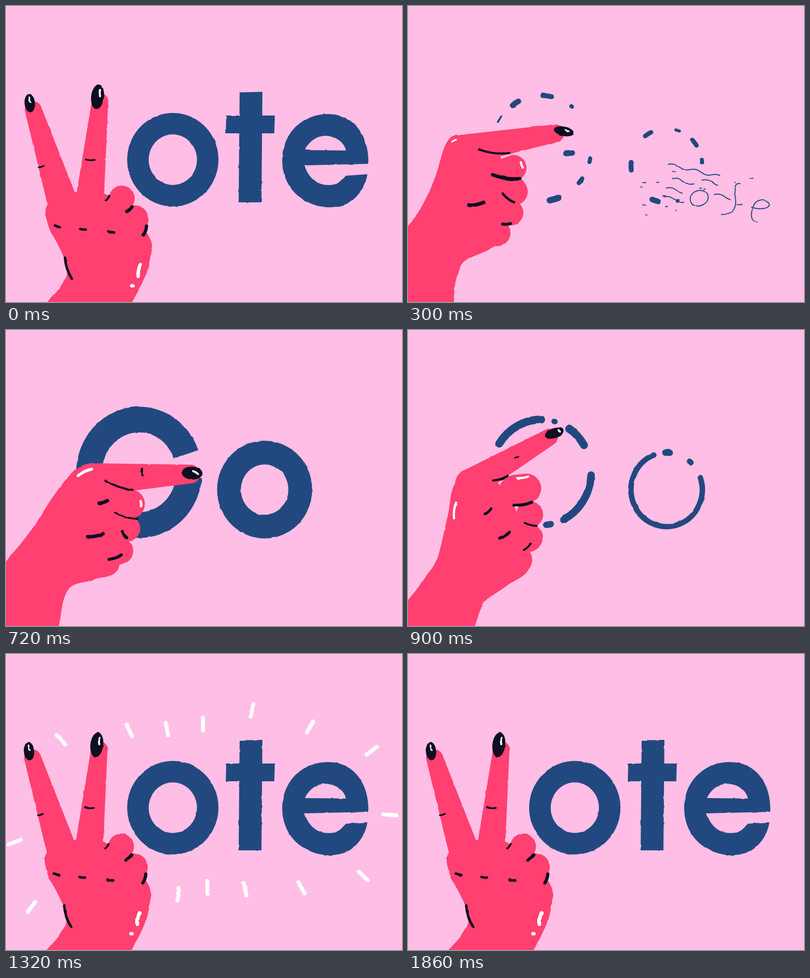
These frames come from a looping animation (800 by 600 pixels, 1.92 s). An HTML page:

```html
<!DOCTYPE html>
<html lang="en">
<head>
<meta charset="utf-8">
<title>Go vote</title>
<style>
  html, body { margin: 0; width: 100%; height: 100%; overflow: hidden; background: #ffbee6; }
  svg { display: block; width: 100vw; height: 100vh; }
</style>
</head>
<body>
<svg viewBox="0 0 800 600">
  <defs>
    <filter id="rough" filterUnits="userSpaceOnUse" x="-20" y="-20" width="840" height="640" color-interpolation-filters="sRGB">
      <feTurbulence id="grain" type="fractalNoise" baseFrequency=".06" numOctaves="2"/>
      <feDisplacementMap in="SourceGraphic" scale="2.5" xChannelSelector="R" yChannelSelector="G"/>
    </filter>
  </defs>
  <g id="art" filter="url(#rough)"></g>
</svg>
<script>
const STEP = 60, STEPS = 32;
const SKIN = '#ff4070', NAVY = '#21497f', INK = '#0d0e20', WHITE = '#fff';
const art = document.getElementById('art');
const grain = document.getElementById('grain');

const numbers = text => text.match(/-?[\d.]+/g).map(Number);
const mix = (a, b, k) => a.map((v, i) => v + (b[i] - v) * k);
const ease = k => k * k * (3 - 2 * k);
const polar = (x, y, rx, ry, angle) => [x + rx * Math.cos(angle), y + ry * Math.sin(angle)];
const fill = (d, color) => `<path d="${d}" fill="${color}" fill-rule="evenodd"/>`;
const stroke = (d, width, color, cap = 'round') =>
  `<path d="${d}" fill="none" stroke="${color}" stroke-width="${width}" stroke-linecap="${cap}"/>`;

function random(seed) {
  return () => (seed = seed * 16807 % 2147483647) / 2147483647;
}

// Smooth closed curve through flat x,y pairs.
function blob(p) {
  const n = p.length / 2;
  const at = i => { const j = (i + n) % n * 2; return [p[j], p[j + 1]]; };
  let d = 'M' + at(0);
  for (let i = 0; i < n; i++) {
    const [a, b, c, e] = [at(i - 1), at(i), at(i + 1), at(i + 2)];
    const c1 = b.map((v, j) => v + (c[j] - a[j]) / 7);
    const c2 = c.map((v, j) => v - (e[j] - b[j]) / 7);
    d += `C${c1} ${c2} ${c}`;
  }
  return d + 'Z';
}

// Tapered finger between two circles.
function capsule([x1, y1, r1, x2, y2, r2]) {
  const turn = Math.atan2(y2 - y1, x2 - x1);
  const lean = Math.acos((r1 - r2) / Math.hypot(x2 - x1, y2 - y1));
  const [a, b] = [turn - lean, turn + lean];
  return `M${polar(x1, y1, r1, r1, a)}L${polar(x2, y2, r2, r2, a)}A${r2} ${r2} 0 0 1 ${polar(x2, y2, r2, r2, b)}` +
    `L${polar(x1, y1, r1, r1, b)}A${r1} ${r1} 0 1 1 ${polar(x1, y1, r1, r1, a)}Z`;
}

// Slightly bent pen marks: x1 y1 x2 y2 width.
const marks = (text, color) => text.split(',').map(mark => {
  const [x1, y1, x2, y2, width] = numbers(mark);
  const bend = [(x1 + x2) / 2 - (y2 - y1) * 0.12, (y1 + y2) / 2 + (x2 - x1) * 0.12];
  return stroke(`M${x1} ${y1}Q${bend} ${x2} ${y2}`, width, color);
}).join('');

// palm: wrist, back of hand, knuckles, wrist; fingers: base and tip circles; curled: knuckle circles
const pose = (palm, fingers, curled, nails, ink, shine) =>
  ({ parts: [palm, ...fingers, ...curled, ...nails].map(numbers), ink, shine });
const NO_NAIL = '230 325 0 0 -40';

const open = pose(
  `70 635 108 572 123 545 119 515 104 482 86 447 83 405 141 377 198 380 260 430 292 475 288 528
   272 568 254 602 238 635`,
  ['112 391 30 55 210 17', '170 385 28 190 193 16.5'],
  ['234 390 26', '260 432 28', '266 486 29'],
  ['48 197 18.5 10.5 -95', '185 184 25 13 -83'],
  `66 327 76 324 3.5, 161 311 179 312 3.5, 202 394 209 385 4, 244 417 255 407 6, 278 464 284 446 6.5,
   99 445 109 448 5, 150 452 161 453 5, 207 457 218 459 5.5, 119 510 133 553 5`,
  '47 185 50 195 3, 190 170 190 183 4, 271 525 267 548 7, 254 567 256 567 7');

const flick = pose(
  `-20 640 -20 540 -8 462 20 420 42 378 58 338 75 283 100 262 180 290 195 380 203 460 165 493
   113 518 97 555 78 635`,
  ['110 292 31 298 258 18', '190 335 24 217 327 26'],
  ['214 376 28', '207 419 26', '180 460 27'],
  ['315 254 20.5 9.5 12', NO_NAIL],
  `144 291 206 298 4, 171 342 226 350 7, 192 381 214 398 5, 123 404 153 398 7, 191 442 207 441 6`,
  '97 271 89 275 3.5, 228 317 232 327 5, 318 251 325 254 3');

const point = pose(
  `-20 640 -20 540 -6 480 30 433 60 393 90 345 122 302 150 278 200 290 235 340 228 480 180 505
   135 518 117 545 90 635`,
  ['172 303 33 373 292 19', '230 355 27 256 352 29'],
  ['244 402 27', '230 448 27', '205 474 24'],
  ['376 290 21 13 3', NO_NAIL],
  `275 281 276 295 4, 201 305 256 324 4, 188 351 205 346 7, 220 370 266 383 3.5, 165 419 196 413 7,
   235 408 244 421 6, 208 465 233 456 6`,
  '173 282 146 295 6, 273 357 272 347 5, 388 292 378 286 4');

const raise = pose(
  `-20 640 -20 585 -6 556 18 525 38 497 60 461 80 378 98 308 170 300 225 380 245 480 200 518
   154 550 146 568 110 635`,
  ['125 312 30 286 217 17', '215 325 31 239 321 30'],
  ['246 374 27', '243 421 29', '222 466 29'],
  ['296 209 20 10 -18', NO_NAIL],
  `216 259 223 257 3, 172 305 201 296 4.5, 214 355 250 349 6, 156 373 168 362 5, 236 391 260 397 4,
   185 422 205 410 6, 234 446 248 433 4`,
  '221 300 243 297 4.5, 97 350 93 382 4.5, 304 203 307 206 4');

const handKeys = [[0, open], [2, open], [5, flick], [7, point], [12, point], [15, raise], [18, open], [STEPS, open]];

function hand(step) {
  const next = handKeys.findIndex(key => key[0] > step);
  const [start, from] = handKeys[next - 1], [end, to] = handKeys[next];
  const k = from === to ? 0 : ease((step - start) / (end - start));
  const [palm, ...rest] = from.parts.map((part, i) => mix(part, to.parts[i], k));
  const [finger, second, ...others] = rest;
  const sway = from === open && step % 3 === 1 ? -1.5 : 0;

  let out = fill(blob(palm), SKIN) + fill(capsule(finger), SKIN) + fill(capsule(second), SKIN);
  for (const [x, y, r] of others.slice(0, 3)) out += `<circle cx="${x}" cy="${y}" r="${r}" fill="${SKIN}"/>`;
  for (const [x, y, rx, ry, turn] of others.slice(3)) {
    out += `<ellipse rx="${rx}" ry="${ry}" fill="${INK}" transform="translate(${x} ${y}) rotate(${turn})"/>`;
  }
  if (k === 0) out += marks(from.ink, INK) + marks(from.shine, WHITE);
  return `<g transform="translate(${sway} 0)">${out}</g>`;
}

// Arcs of one ring, each [from, to, width] in degrees.
const arcs = ([x, y, rx, ry], list, cap) => list.map(([from, to, width]) => {
  const [a, b] = [from, to].map(v => v * Math.PI / 180);
  const long = to - from > 180 ? 1 : 0;
  return stroke(`M${polar(x, y, rx, ry, a)}A${rx} ${ry} 0 ${long} 1 ${polar(x, y, rx, ry, b)}`, width, NAVY, cap);
}).join('');
const ALL = 359.9;

// The word after the V-shaped hand
const voteRing = [337, 311.5, 70.5, 73];
const tShape = 'M472 175L518 174L516 398L470 398Z', tBar = 'M445 222H543L542 258H444Z';
const eShape = `M731 320L603 323C610 345 625 363 652 363C674 363 678 352 687 344L730 341C726 370 707 390 694 398
  C680 406 665 408 650 408C595 404 558 365 558 312C558 257 600 219 650 219C704 219 733 264 732 317Z
  M604 292C612 274 628 263 646 263C667 264 683 276 687 293Z`;
const wholeWord = arcs(voteRing, [[0, ALL, 43.5]]) + [tShape, tBar, eShape].map(d => fill(d, NAVY)).join('');

const thinWord = (width, dash) => `<g stroke-dasharray="${dash}">` + arcs(voteRing, [[0, ALL, width]]) +
  stroke('M495 175V398M446 239H544M600 307H711', width, NAVY) +
  arcs([645, 312, 66, 74], [[30, 360, width]]) + '</g>';

const tinyLetters = `M600 377C585 368 570 380 570 392C572 412 600 408 606 392C608 380 602 374 590 374
  M671 360C662 358 659 366 660 380C664 400 662 408 655 417C648 422 640 421 633 423M665 403L676 402
  M693 408C715 414 730 410 730 402C724 388 703 391 698 405C690 425 694 437 705 438`;

// Wavy gusts sloping down to the right, with specks around them.
function wind() {
  const gusts = [[526, 321, 106], [534, 350, 44], [594, 353, 32], [522, 369, 34], [517, 387, 41], [619, 382, 34]];
  const next = random(11);
  let d = '';
  for (const [x, y, length] of gusts) {
    for (let s = 0; s <= length; s += 4) {
      d += `${s ? 'L' : 'M'}${x + s} ${y + s * 0.24 - 3 * Math.sin(s / 7)}`;
    }
  }
  for (let i = 0; i < 14; i++) d += `M${470 + 230 * next()} ${305 + 138 * next()}h${1 + 6 * next()}`;
  return d;
}

function word(step) {
  if (step >= 18 || step < 2) return wholeWord;
  if (step < 5) {
    const blown = mix([1, 0, 0, 1, 0, 0], [0.4, 0.06, 0, 0.35, 453, 262], ease((step - 1) / 4));
    return `<g transform="matrix(${blown})">${wholeWord}</g>`;
  }
  if (step === 5) return stroke(tinyLetters + wind(), 2, NAVY);
  if (step === 6) return `<g transform="translate(18 10)">${stroke(tinyLetters, 1, NAVY)}</g>`;
  if (step === 16) return thinWord(9, '14 42');
  return step === 17 ? thinWord(22, 'none') : '';
}

// The short word the hand completes
const gRing = [269, 288.5, 101, 107], oRing = [522.5, 323.5, 72, 75];
const gDashes = [[-150, -143, 4], [-125, -117, 11], [-88, -78, 10], [-53, -52, 8], [11, 15, 8], [35, 41, 9], [70, 80, 13]];
const oDashes = [[-127, -116, 9], [-75, -69, 6], [-44, -33, 9], [-9, -5, 8], [72, 73, 7], [104, 114, 11], [173, 185, 10]];
const gBroken = [[-147, -90, 16], [-75, -74, 11], [-56, -31, 16], [3, 63, 15], [79, 84, 13]];
const oBroken = [[-19, 249, 11], [-92, -85, 13], [-50, -47, 11]];

function go(step) {
  if (step === 5 || step === 16) {
    return arcs(gRing, gDashes) + arcs(oRing, oDashes) + stroke('M319 299L332 298', 11, NAVY);
  }
  if (step === 15) return arcs(gRing, gBroken) + arcs(oRing, oBroken);
  if (step < 6 || step > 15) return '';
  const weight = Math.min(1, (step - 5) / 2, (16 - step) / 4);
  return arcs(gRing, [[5, 340, 52 * weight]], 'butt') + arcs(oRing, [[0, ALL, 48 * weight]]);
}

// Ticks sit around a word and shoot away from its middle.
const goTicks = numbers(`137 117 305 96 77 239 511 154 624 208 665 294 672 386 626 469 524 487 423 481 295 520`);
const voteTicks = numbers(`111 174 249 155 325 152 398 142 497 114 614 148 739 196 775 326 722 450 597 474
  483 477 407 473 348 487 51 513 18 381`);

function burst(spots, [cx, cy], age) {
  const size = 1 - Math.abs(age) * 0.25;
  let out = '';
  for (let i = 0; i < spots.length; i += 2) {
    const [x, y] = [spots[i], spots[i + 1]];
    const turn = Math.atan2(y - cy, (x - cx) * 0.45);
    const reach = 13 * size;
    const from = polar(x, y, age * 25 - reach, age * 25 - reach, turn);
    const to = polar(x, y, age * 25 + reach, age * 25 + reach, turn);
    out += stroke(`M${from}L${to}`, 8 * size, WHITE);
  }
  return out;
}

function sparks(step) {
  if (step >= 8 && step <= 11) return burst(goTicks, [380, 320], step - 9);
  if (step >= 21 && step <= 25) return burst(voteTicks, [400, 312], step - 22);
  return '';
}

let shown = -1;
function draw(now) {
  const step = Math.floor(now / STEP) % STEPS;
  if (step !== shown) {
    shown = step;
    grain.setAttribute('seed', 1 + step % 3);
    art.innerHTML = sparks(step) + go(step) + word(step) + hand(step);
  }
}

const start = performance.now();
function tick() {
  draw(performance.now() - start);
  requestAnimationFrame(tick);
}
tick();
</script>
</body>
</html>
```
